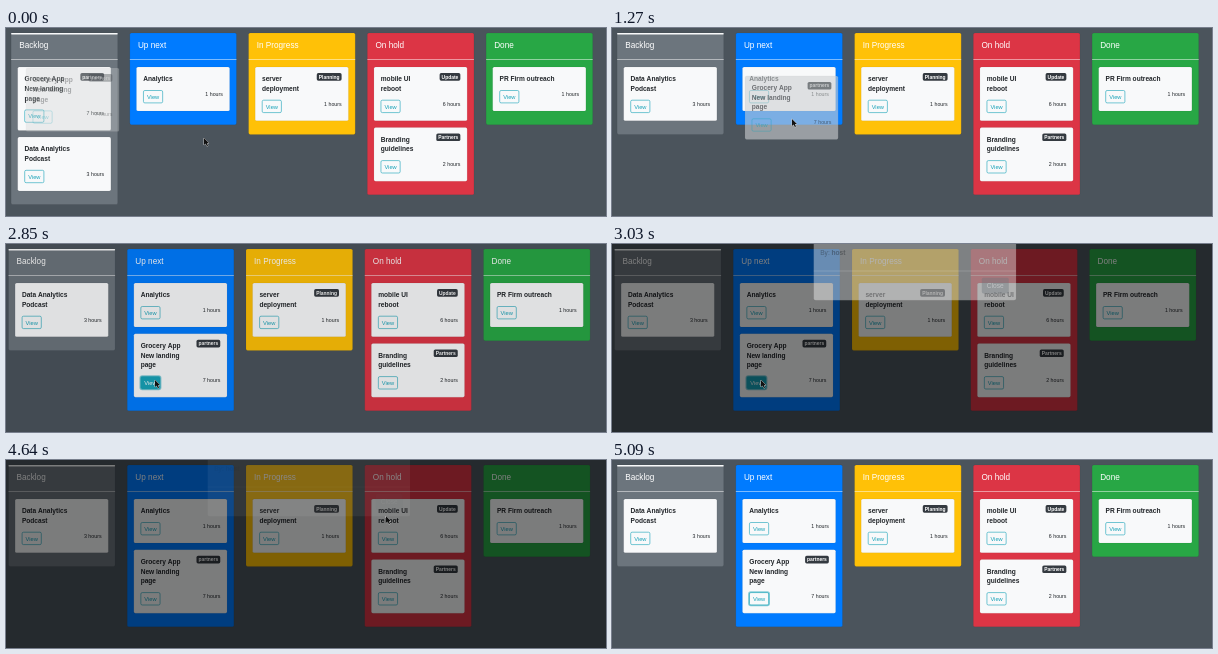
These frames come from a looping animation (600x188 px, 5.51 s). An HTML page with a canvas:

```html
<!DOCTYPE html>
<html lang="en">
<head>
<meta charset="utf-8">
<title>Task board</title>
<style>
  html, body { margin: 0; width: 100%; height: 100%; overflow: hidden; background: #4b545c; }
  canvas { display: block; width: 600px; height: 188px; }
</style>
</head>
<body>
<canvas id="stage"></canvas>
<script>
const LOOP = 5510;
const canvas = document.getElementById('stage');
const ctx = canvas.getContext('2d');
const ratio = window.devicePixelRatio || 1;
canvas.width = 600 * ratio;
canvas.height = 188 * ratio;

const INK = '#212529', TEAL = '#17a2b8', LIGHT = '#f8f9fa';
const LINE = 9.7, CARD_W = 93.2, COL_W = 106.6, GRAB = [47, 43];

const card = (lines, hours, badge) => ({ lines, hours, badge, h: 34.4 + LINE * lines.length });
const moved = card(['Grocery App', 'New landing', 'page'], 7, 'partners');
const podcast = card(['Data Analytics', 'Podcast'], 3);
const analytics = card(['Analytics'], 1);
const columns = [
  { name: 'Backlog', color: '#6c757d' },
  { name: 'Up next', color: '#007bff' },
  { name: 'In Progress', color: '#ffc107', cards: [card(['server', 'deployment'], 1, 'Planning')] },
  { name: 'On hold', color: '#dc3545', cards: [
    card(['mobile UI', 'reboot'], 6, 'Update'),
    card(['Branding', 'guidelines'], 2, 'Partners')] },
  { name: 'Done', color: '#28a745', cards: [card(['PR Firm outreach'], 1)] }
];

// Cursor tip: time, x, y
const path = [
  [0, 198, 110], [30, 198, 110], [230, 59, 82], [290, 59, 82], [580, 171, 85],
  [640, 174, 85], [790, 190, 83], [940, 190, 83], [1450, 176, 94], [1520, 176, 94],
  [1910, 173, 89], [2090, 171, 106], [2550, 149, 136], [3300, 149, 136],
  [3760, 369, 54], [3850, 377, 52], [4120, 381, 56], [4640, 380, 56],
  [5000, 320, 126], [5060, 325, 147], [5090, 326, 150]
];

const clamp = v => Math.max(0, Math.min(1, v));
const progress = (t, start, length) => clamp((t - start) / length);
const mix = (a, b, p) => a + (b - a) * p;
const smooth = p => p * p * (3 - 2 * p);
const easeOut = p => 1 - Math.pow(1 - p, 1.75);

function cursorAt(t) {
  const i = path.findIndex(k => k[0] > t);
  if (i < 0) return null;
  const a = path[i - 1], b = path[i];
  const p = smooth((t - a[0]) / (b[0] - a[0]));
  return [mix(a[1], b[1], p), mix(a[2], b[2], p)];
}

function text(str, x, y, size, color, bold, align = 'left') {
  ctx.font = `${bold ? 'bold ' : ''}${size}px "Liberation Sans", Arial, sans-serif`;
  ctx.textAlign = align;
  ctx.fillStyle = color;
  ctx.fillText(str, x, y);
}

function box(x, y, w, h, r, fill, stroke, width = 0.6) {
  ctx.beginPath();
  ctx.roundRect(x, y, w, h, r);
  if (fill) { ctx.fillStyle = fill; ctx.fill(); }
  if (stroke) { ctx.strokeStyle = stroke; ctx.lineWidth = width; ctx.stroke(); }
}

function drawCard(c, x, y, fill = LIGHT, button = '') {
  box(x, y, CARD_W, c.h, 1.6, fill, 'rgba(0,0,0,.13)', 0.4);
  c.lines.forEach((line, i) => text(line, x + 6.8, y + 14.2 + LINE * i, 6.6, INK, true));
  const by = y + c.h - 20.6, bx = x + 7, filled = button === 'hover';
  if (button) box(bx - 0.6, by - 0.6, 20.4, 13.6, 2, null, 'rgba(23,162,184,.5)', 1.5);
  box(bx, by, 19.2, 12.4, 1.4, filled ? TEAL : null, TEAL);
  text('View', bx + 9.6, by + 8.3, 5.74, filled ? '#fff' : TEAL, false, 'center');
  text(`${c.hours} hour${'s'}`, x + 86.4, y + c.h - 15.2, 5.25, INK, false, 'right');
  if (c.badge) {
    ctx.font = 'bold 4.95px "Liberation Sans", Arial, sans-serif';
    const w = ctx.measureText(c.badge).width + 4;
    box(x + 86.4 - w, y + 6.1, w, 7.6, 1.6, '#343a40');
    text(c.badge, x + 84.4, y + 11.6, 4.95, '#fff', true, 'right');
  }
}

function drawColumn({ name, color }, cards, x, button) {
  const bottom = cards.reduce((y, c) => y + c.h + 6.6, 39) + 7;
  box(x, 5, COL_W, bottom - 5, 1.6, color, 'rgba(0,0,0,.12)', 0.5);
  if (name === 'Backlog') box(x, 5, COL_W, 1.4, 0.6, LIGHT);
  box(x, 31, COL_W, 0.8, 0, 'rgba(255,255,255,.65)');
  text(name, x + 8.1, 19.6, 8.2, '#fff');
  let y = 39;
  for (const c of cards) {
    drawCard(c, x + 6.6, y, LIGHT, c === moved ? button : '');
    y += c.h + 6.6;
  }
}

function drawGhost(x, y, alpha) {
  ctx.save();
  ctx.globalAlpha = alpha;
  drawCard(moved, x, y, '#cdd0d2');
  ctx.restore();
}

function drawGhosts(t, cursor) {
  if (t < 150) {
    const p = t / 150;
    drawGhost(mix(20, 12, p), mix(40, 39, p), 0.35 * (1 - p));
  } else if (t >= 290 && t < 1520) {
    drawGhost(cursor[0] - GRAB[0], cursor[1] - GRAB[1], 0.6);
  } else if (t >= 1520 && t < 1850) {
    const p = smooth(progress(t, 1520, 330));
    drawGhost(mix(129, 12, p), mix(51, 39, p), 0.6 * (1 - p));
  }
}

function drawModal(t) {
  const closing = t >= 4500;
  const alpha = closing ? 1 - progress(t, 4500, 150) : progress(t, 2970, 150);
  if (alpha <= 0) return;
  const lift = closing ? easeOut(progress(t, 4500, 300)) : 1 - easeOut(progress(t, 2970, 300));
  ctx.save();
  ctx.globalAlpha = alpha;
  ctx.translate(0, -20.5 * lift);
  box(201.7, -15, 202.4, 85, 2, '#fff', 'rgba(0,0,0,.2)', 0.4);
  box(201.7, 10.4, 202.4, 0.4, 0, '#dee2e6');
  box(201.7, 40.6, 202.4, 0.4, 0, '#dee2e6');
  text(moved.lines.join(' '), 208.2, 0.9, 8.2, INK);
  text('By: ', 208.2, 24.8, 6.6, INK);
  text('host', 208.2 + ctx.measureText('By: ').width, 24.8, 6.6, INK, true);
  box(369.8, 47.6, 27, 15.6, 1.6, t >= 3880 ? '#5a6268' : '#6c757d');
  text('Close', 383.3, 57.8, 6.6, '#fff', false, 'center');
  ctx.restore();
}

function drawCursor([x, y]) {
  ctx.save();
  ctx.translate(x, y);
  ctx.beginPath();
  for (const [px, py] of [[0, 0], [0, 7], [1.7, 5.6], [2.9, 8.2], [4, 7.7], [2.9, 5.2], [5, 5]]) ctx.lineTo(px, py);
  ctx.closePath();
  ctx.lineWidth = 0.8;
  ctx.strokeStyle = '#ddd';
  ctx.stroke();
  ctx.fillStyle = '#111';
  ctx.fill();
  ctx.restore();
}

function draw(t) {
  const cursor = cursorAt(t);
  const dropped = t >= 1520;
  const shift = t >= 2760 && t < 4970 ? -2.6 : 0;
  const button = t >= 2400 && t < 3300 ? 'hover' : t >= 4970 ? 'focus' : '';
  const backlog = t < 290 ? [moved, podcast] : [podcast];
  const upNext = dropped ? [analytics, moved] : [analytics];

  ctx.setTransform(ratio, 0, 0, ratio, 0, 0);
  ctx.fillStyle = '#4b545c';
  ctx.fillRect(0, 0, 600, 188);
  columns.forEach((col, i) =>
    drawColumn(col, [backlog, upNext][i] || col.cards, 5.1 + 118.75 * i + shift, button));
  drawGhosts(t, cursor);

  const dim = 0.5 * (progress(t, 2820, 150) - progress(t, 4800, 150));
  ctx.fillStyle = `rgba(0,0,0,${dim})`;
  ctx.fillRect(0, 0, 600, 188);
  drawModal(t);
  if (cursor) drawCursor(cursor);
}

const start = performance.now();
function tick() {
  draw((performance.now() - start) % LOOP);
  requestAnimationFrame(tick);
}
tick();
</script>
</body>
</html>
```
